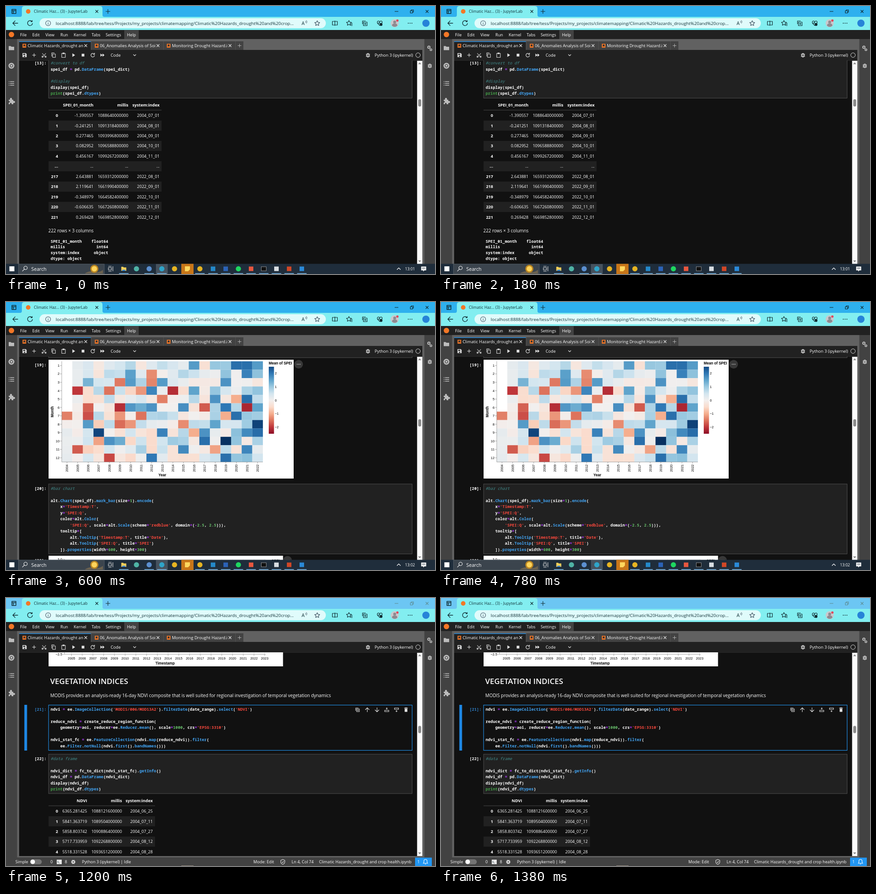
These frames come from a looping animation (947x592 px, 1500 ms). An HTML page:

```html
<!DOCTYPE html>
<html lang="en">
<head>
<meta charset="utf-8">
<title>Notebook scroll</title>
<style>
html, body { margin: 0; width: 100%; height: 100%; overflow: hidden; background: #111; }
svg { display: block; width: 947px; height: 592px; }
text { font-family: "Open Sans", "Noto Sans", sans-serif; fill: #fff; white-space: pre; }
.mono { font: 600 8.84px "Noto Sans Mono", "DejaVu Sans Mono", monospace; }
.chart text { font-family: "Liberation Sans", Arial, sans-serif; fill: #000; }
.bold { font-weight: 700; }
.semi { font-weight: 600; }
.end { text-anchor: end; }
.mid { text-anchor: middle; }
.dark { fill: #14343a; }
.comment { fill: #408a8a; font-weight: 400; font-style: italic; }
.string { fill: #f4473c; }
.number { fill: #66bb6a; }
.op { fill: #b13cff; }
.prop { fill: #42a5f5; }
.builtin { fill: #43a047; }
.page, .thumb, .late, .early, .first, .rest { animation: 1.5s step-end infinite; }
.page { animation-name: page; }
.thumb { animation-name: thumb; }
.late { animation-name: late; }
.early { animation-name: early; }
.first { animation-name: first; }
.rest { animation-name: rest; }
@keyframes page {
  0% { transform: translateY(0); }
  20% { transform: translateY(-1000px); }
  40% { transform: translateY(-2000px); }
  60% { transform: translateY(-2296px); }
  80%, 100% { transform: translateY(-2666px); }
}
@keyframes thumb {
  0% { transform: translateY(0); }
  20% { transform: translateY(31.5px); }
  40% { transform: translateY(53px); }
  60% { transform: translateY(63px); }
  80%, 100% { transform: translateY(76.5px); }
}
@keyframes late { 0% { visibility: hidden; } 80%, 100% { visibility: visible; } }
@keyframes early { 0% { visibility: visible; } 80%, 100% { visibility: hidden; } }
@keyframes first { 0% { opacity: 1; } 20%, 100% { opacity: 0; } }
@keyframes rest { 0% { opacity: 0; } 20%, 100% { opacity: 1; } }
</style>
</head>
<body>
<svg id="stage" viewBox="0 0 947 592"></svg>
<script>
const esc = s => String(s).replace(/&/g, '&amp;').replace(/</g, '&lt;');
const range = (n, fn) => Array.from({ length: n }, (_, i) => fn(i)).join('');
const rect = (x, y, w, h, fill, attr = '') =>
  `<rect x="${x}" y="${y}" width="${w}" height="${h}" fill="${fill}" ${attr}/>`;
const dot = (x, y, r, fill, attr = '') => `<circle cx="${x}" cy="${y}" r="${r}" fill="${fill}" ${attr}/>`;
const line = (d, color, w = 0.74) => `<path d="${d}" fill="none" stroke="${color}" stroke-width="${w}"/>`;
const icon = (x, y, d, color = '#e0e0e0', w = 1.1) =>
  `<path transform="translate(${x} ${y})" d="${d}" fill="none" stroke="${color}" stroke-width="${w}" stroke-linejoin="round"/>`;
const solid = (x, y, d, color = '#e0e0e0') =>
  `<path transform="translate(${x} ${y})" d="${d}" fill="${color}" fill-rule="evenodd"/>`;
const group = (cls, body, y = 0) => `<g class="${cls}"${y ? ` transform="translate(0 ${y})"` : ''}>${body}</g>`;

// y is the middle of the capitals
const text = (x, y, s, cls = '', size = 9.2, attr = '') =>
  `<text x="${x}" y="${(y + size * 0.36).toFixed(2)}" font-size="${size}" class="${cls}" ${attr}>${esc(s)}</text>`;
const mono = (x, y, s, attr = '') => text(x, y, s, 'mono', 8.84, attr);
const prompt = (y, n, attr = '') => mono(62.8, y, `[${n}]:`, attr);

const token = /(#.*)|('[^']*')|(\b\d+(?:\.\d+)?\b)|([=*-])|((?<=\.)[a-z_]\w*)|(\bprint\b)/gi;
const kinds = ['comment', 'string', 'number', 'op', 'prop', 'builtin'];
const paint = s => esc(s).replace(token, (m, ...g) =>
  `<tspan class="${kinds[g.findIndex(v => v !== undefined)]}">${m}</tspan>`);

function cell(y, h, n, src, active) {
  const frame = active
    ? rect(40.5, y, 6, h, '#1e88e5') + rect(94, y + .5, 802.5, h - 1, '#111', 'stroke="#2196f3" stroke-width="1.1"')
    : rect(94, y, 802.5, h, '#212121', 'stroke="#5c5c5c" stroke-width=".8"');
  const rows = src.split('\n').map((s, i) =>
    `<text class="mono" x="98.5" y="${y + 13.1 + i * 13.45}">${paint(s)}</text>`).join('');
  return frame + prompt(y + 10, n, active ? 'style="fill:#2f7fc6"' : '') + rows;
}

const output = (y, rows) => rows.map((s, i) => mono(98.5, y + i * 12.6, s)).join('');

function table(y, width, edges, head, rows) {
  const put = (v, i, yy, bold) => text(edges[i], yy, v, bold ? 'end bold' : 'end', 9.1);
  return head.map((h, i) => put(h, i + 1, y, true)).join('') +
    line(`M94 ${y + 11}h${width}`, '#606060') +
    rows.map((r, k) => {
      const yy = y + 22.8 + k * 22.45;
      return (k % 2 ? rect(94, yy - 11.2, width, 22.4, '#212121') : '') +
        r.split(' ').map((v, i) => put(v, i, yy, i === 0)).join('');
    }).join('');
}

// Monthly index: notable months, mild noise elsewhere
const peaks = {
  2004: { 7: -1.39 }, 2005: { 4: -2, 11: -1.7 },
  2006: { 3: 1.3, 6: -1.65, 7: -1.8, 8: 1.6 }, 2007: { 9: 2.6, 10: -1.1 },
  2008: { 4: -1.5, 10: 1.7, 12: -1.85 }, 2009: { 3: -1.45, 6: -2.1, 7: -1.2, 8: -1.55, 10: 1.4 },
  2010: { 2: 1.55, 3: 1.6, 6: 1.65, 8: -1.2 }, 2011: { 4: -1.2, 6: 1.4, 7: -1.5 },
  2012: { 2: -1.3, 3: -1.35, 4: 1.85, 6: 1.7, 12: 2 }, 2013: { 3: 1.6, 5: -1.4, 9: 1.9 },
  2014: { 4: -2.1 }, 2015: { 6: 1.75, 8: -1.3, 11: 1.8 }, 2016: { 1: 1.6, 4: 1.5, 9: -1 },
  2017: { 6: -1.7, 9: 1.7, 10: 2.1 }, 2018: { 5: 1.7, 8: 1.5, 11: -1.1 },
  2019: { 3: 1.7, 6: 2, 7: -1, 10: 2.9, 12: 2.1 }, 2020: { 1: 2.1, 5: -1, 7: 2.1 },
  2021: { 1: 2.1, 2: 1.9, 5: 2.1, 6: -2.2, 9: 1.8, 11: 1.85 }, 2022: { 1: 1.6, 6: 1.5, 8: 2.64, 9: 2.12 }
};
let seed = 41;
const random = () => (seed = (seed * 16807) % 2147483647) / 2147483647;
const months = [];
for (let n = 6; n < 228; n++) {
  const col = Math.floor(n / 12), row = n % 12;
  // calm at first, wetter later
  const noise = (random() - 0.5) * (col < 2 ? 0.4 : 1.5) + col * 0.025;
  months.push({ n, col, row, v: peaks[2004 + col][row + 1] ?? noise });
}

const ramp = ['8c0d26', 'bf363a', 'dd735c', 'f5ae8e', 'fadccd', 'f2efee',
  'd2e5ef', '9ccae1', '5fa4cc', '2f78b5', '134b85', '052a58'];
function color(v) {
  const p = Math.max(0, Math.min(10.99, (v + 2.5) * 2)), i = Math.floor(p), f = p - i;
  const part = (s, k) => parseInt(s.slice(k, k + 2), 16);
  const mix = k => Math.round(part(ramp[i], k) * (1 - f) + part(ramp[i + 1], k) * f);
  return `rgb(${mix(0)},${mix(2)},${mix(4)})`;
}
const minus = s => String(s).replace('-', '−');
const legend = (x, y, title) => text(x, y - 8.3, title, 'bold', 8.14) +
  rect(x, y, 11.6, 148, 'url(#ramp)') +
  [2, 1, 0, -1, -2].map(v => text(x + 13.4, y + 74 - v * 29.6, minus(v), '', 7.4)).join('');
const menuDot = (x, y) => dot(x, y, 9.5, '#383838') + [-3.2, 0, 3.2].map(d => dot(x + d, y, 1.1, '#aaa')).join('');

function heatMap() {
  const x0 = 123, y0 = 131, w = 444 / 19, h = 222.4 / 12;
  return rect(94, 127.5, 541, 262.5, '#fff') +
    months.map(m => rect((x0 + m.col * w).toFixed(2), (y0 + m.row * h).toFixed(2), w + .1, h + .1, color(m.v))).join('') +
    line(`M${x0} ${y0}v222.4h444`, '#888') +
    range(12, i => line(`M119.3 ${y0 + (i + .5) * h}h3.7`, '#888') +
      text(118, y0 + (i + .5) * h, i + 1, 'end', 7.4)) +
    range(19, i => {
      const x = x0 + (i + .5) * w;
      return line(`M${x} 353.4v3.7`, '#888') +
        text(0, 0, 2004 + i, 'end', 7.4, `transform="translate(${x} 358.8) rotate(-90)"`);
    }) +
    text(345, 382, 'Year', 'bold mid', 8.14) +
    text(0, 0, 'Month', 'bold mid', 8.14, 'transform="translate(102 242.5) rotate(-90)"') +
    legend(580, 143, 'Mean of SPEI');
}

function barChart() {
  const zero = 393.3, unit = 40.4, year = 23.7, yearX = i => 144.5 + i * year;
  return rect(94, 264.5, 517.5, 256.5, '#fff') +
    range(12, i => {
      const y = 272 + i * 20.2;
      return line(`M129 ${y}h444`, '#ddd') + line(`M125.3 ${y}h3.7`, '#888') +
        text(124, y, minus((3 - i / 2).toFixed(1)), 'end', 7.4);
    }) +
    range(19, i => line(`M${yearX(i)} 272v222`, '#ddd') + line(`M${yearX(i)} 494v3.7`, '#888') +
      text(yearX(i), 503, 2005 + i, 'mid', 7.4)) +
    months.map(m => line(`M${(yearX(-1) + m.n * year / 12).toFixed(2)} ${zero}v${(-m.v * unit).toFixed(2)}`, color(m.v), .8)).join('') +
    line('M129 272v222h444', '#888') +
    text(351, 514, 'Timestamp', 'bold mid', 8.14) +
    text(0, 0, 'SPEI', 'bold mid', 8.14, 'transform="translate(101.5 383) rotate(-90)"') +
    legend(586, 284, 'SPEI');
}

const frameTop = cell(116, 87.5, 13, `#convert to df
spei_df = pd.DataFrame(spei_dict)

#display
display(spei_df)
print(spei_df.dtypes)`) +
  table(219, 249.5, [115, 193, 270, 339], ['SPEI_01_month', 'millis', 'system:index'], [
    '0 -1.390557 1088640000000 2004_07_01', '1 -0.241251 1091318400000 2004_08_01',
    '2 0.277465 1093996800000 2004_09_01', '3 0.082952 1096588800000 2004_10_01',
    '4 0.456167 1099267200000 2004_11_01', '... ... ... ...',
    '217 2.643881 1659312000000 2022_08_01', '218 2.119641 1661990400000 2022_09_01',
    '219 -0.348979 1664582400000 2022_10_01', '220 -0.606635 1667260800000 2022_11_01',
    '221 0.269428 1669852800000 2022_12_01']) +
  text(93.5, 496, '222 rows × 3 columns', '', 9.9) +
  output(519.7, ['SPEI_01_month    float64', 'millis             int64', 'system:index      object', 'dtype: object']);

const cleaning = cell(134.7, 73.5, 16, `#some house cleaning
spei_df = spei_df.rename(columns={
    'SPEI_01_month': 'SPEI'
}).drop(columns=['millis', 'system:index'])
spei_df.head(5)`) + prompt(223, 16) +
  table(224, 254, [104, 156, 216, 246, 286, 313, 343], ['SPEI', 'Timestamp', 'Year', 'Month', 'Day', 'DOY'], [
    '0 -1.390557 2004-07-01 2004 7 1 183', '1 -0.241251 2004-08-01 2004 8 1 214',
    '2 0.277465 2004-09-01 2004 9 1 245', '3 0.082952 2004-10-01 2004 10 1 275',
    '4 0.456167 2004-11-01 2004 11 1 306']) +
  cell(365, 33, 17, '#check data type\nspei_df.dtypes') + prompt(412, 17) +
  output(412, [['SPEI', 'float64'], ['Timestamp', 'datetime64[ns]'], ['Year', 'int32'], ['Month', 'int32'],
    ['Day', 'int32'], ['DOY', 'int32']].map(([a, b]) => a + b.padStart(27 - a.length)).concat('dtype: object')) +
  text(97.5, 522.7, 'visualisation', 'semi', 16.3) +
  cell(546, 20.5, 18, '#+VE = wet conditions -Ve= dry conditions');

const vegetation = text(97.5, 183.6, 'VEGETATION INDICES', 'semi', 17) +
  text(97.8, 215, 'MODIS provides an analysis-ready 16-day NDVI composite that is well suited for regional investigation of temporal vegetation dynamics', '', 9.89) +
  cell(236, 101, 21, `ndvi = ee.ImageCollection('MODIS/006/MOD13A2').filterDate(date_range).select('NDVI')

reduce_ndvi = create_reduce_region_function(
    geometry=aoi, reducer=ee.Reducer.mean(), scale=1000, crs='EPSG:3310')

ndvi_stat_fc = ee.FeatureCollection(ndvi.map(reduce_ndvi)).filter(
    ee.Filter.notNull(ndvi.first().bandNames()))`, true) +
  icon(776, 247, 'M-2-2h6v6h-6zM-4 2v-6h6M1-.5v3M-.5 1h3') +
  icon(797.5, 247, 'M0 5v-9M-4.5 0l4.5-4.5L4.5 0') +
  icon(819, 247, 'M0-5v9M-4.5 0l4.5 4.5L4.5 0') +
  icon(840.5, 247, 'M-4.5 1h9v3h-9zM0-5v4.5M-2-3h4') +
  icon(862, 247, 'M-4.5-4h9v3h-9zM0 1v4M-2 3h4') +
  solid(883, 247, 'M-3-2.5h6v7h-6zM-4-4.5h2.5v-.8h3v.8H4v1.2h-8z') +
  cell(345, 87, 22, `#data frame

ndvi_dict = fc_to_dict(ndvi_stat_fc).getInfo()
ndvi_df = pd.DataFrame(ndvi_dict)
display(ndvi_df)
print(ndvi_df.dtypes)`) +
  table(448, 235, [115, 179, 256, 324], ['NDVI', 'millis', 'system:index'], [
    '0 6365.281425 1088121600000 2004_06_25', '1 5841.363719 1089504000000 2004_07_11',
    '2 5858.803742 1090886400000 2004_07_27', '3 5717.733959 1092268800000 2004_08_12',
    '4 5518.331528 1093651200000 2004_08_28']);

const charts = rect(94, 90, 802.5, 33, '#212121', 'stroke="#5c5c5c" stroke-width=".8"') +
  prompt(138.5, 19) + group('chart', heatMap()) + menuDot(646, 137.5) +
  cell(402, 154.5, 20, `#bar chart

alt.Chart(spei_df).mark_bar(size=1).encode(
    x='Timestamp:T',
    y='SPEI:Q',
    color=alt.Color(
        'SPEI:Q', scale=alt.Scale(scheme='redblue', domain=(-2.5, 2.5))),
    tooltip=[
        alt.Tooltip('Timestamp:T', title='Date'),
        alt.Tooltip('SPEI:Q', title='SPEI')
    ]).properties(width=600, height=300)`) +
  prompt(571, 20) + group('chart', barChart(), 296) + menuDot(621.5, 570.5) +
  group('', vegetation, 666);

// Browser window
const cross = 'M-3-3l6 6M3-3l-6 6', plus = 'M-4 0h8M0-4v8';
const star = 'M0-5.5l1.7 3.5 3.9.5-2.9 2.7.8 3.8L0 3.2-3.5 5l.8-3.8-2.9-2.7 3.9-.5z';
const windowButtons = c => icon(862, 12, 'M-4 0h8', c) +
  icon(896, 12, 'M-3.5-1.5h5v5h-5zM-1.5-1.5v-2h5v5h-2', c) + icon(929.5, 12, cross, c);
const browser = rect(0, 0, 947, 53, '#82eef0') +
  rect(0, 0, 947, 24, '#2eb0ee', 'class="early"') + rect(0, 0, 947, 24, '#6cc6f3', 'class="late"') +
  solid(0, 0, 'M31 24q4 0 4-4V6q0-6 6-6h166q6 0 6 6v14q0 4 4 4z', '#82eef0') +
  icon(17.5, 12, 'M-4.5-4.5h9v9h-9zM-4.5-1.5h9M-1.5-1.5v6', '#102a30', 1.4) +
  dot(49, 12, 5, '#f37726') + text(61.5, 12, 'Climatic Haz... (3) - JupyterLab', 'dark', 8.62) +
  icon(200.5, 12, cross, '#102a30') + icon(225, 12, 'M-5 0h10M0-5v10', '#102a30') +
  group('early', windowButtons('#102a30')) + group('late', windowButtons('#5e8f96')) +
  icon(20.5, 38, 'M6 0h-11.5M0-5.5l-5.5 5.5 5.5 5.5', '#102a30', 1.3) +
  icon(53, 38, 'M4-4a5.5 5.5 0 1 0 1.5 4M4.8-6.5v3h-3', '#102a30', 1.3) +
  rect(74, 27, 632, 22, '#e0fbfb', 'rx="11"') +
  icon(93, 38, 'M5.5 0a5.5 5.5 0 1 1-11 0a5.5 5.5 0 1 1 11 0M0-.8v4M0-3.2v1.2', '#456') +
  text(109.8, 38, 'localhost:8888/lab/tree/tess/Projects/my_projects/climatemapping/Climatic%20Hazards_drought%20and%20crop...', 'dark', 9.82) +
  text(652.5, 38.5, 'A', 'dark', 10.5) + icon(661, 35, 'M0-2q2 2 0 4M2-3.5q3 3.5 0 7', '#345', .8) +
  icon(687, 38, star, '#345') +
  icon(726, 38, 'M-5.5-4h11v8h-11zM0-5.5v11', '#102a30', 1.2) +
  icon(757, 37.5, star, '#102a30') + icon(762, 39, 'M-1-1h4M-1 1.5h4M-1 4h4', '#102a30') +
  icon(792, 38, 'M-3-2.5h8v8h-8zM-5 2v-7h7M1-1v5M-1.5 1.5h5', '#102a30', 1.2) +
  icon(825, 38, 'M0 5L-5 0q-1.5-4 2-5 2 0 3 2 1-2 3-2 3.5 1 2 5zM-4 0h2l1-2 2 4 1-2h2', '#102a30', 1.2) +
  dot(828, 41, 3, '#102a30') +
  dot(858, 38, 9, '#c9c9cd') + dot(858, 35.5, 3.2, '#8d8a90') + solid(858, 38, 'M-6 5.5q0-5 6-5t6 5q-6 5-12 0', '#8d8a90') +
  dot(864, 32, 2.6, '#e0475b') +
  [888, 892, 896].map(x => dot(x, 38, 1, '#102a30')).join('') + dot(927, 38, 8, '#2683d8');

// Notebook shell
const menus = [[31, 'File'], [58, 'Edit'], [87, 'View'], [120, 'Run'], [149.5, 'Kernel'], [189, 'Tabs'], [220, 'Settings'], [267, 'Help']];
const tabs = [[29, 'Climatic Hazards_drought an'], [188.5, '06_Anomalies Analysis of Soi'], [347.5, 'Monitoring Drought Hazard.i']];
const bug = 'M-2.5-2.5h5v5.5q-2.5 2.5-5 0zM-4.5-2h9M-4.5.5h9M-4.5 3h9M-1.5-4.5l1 1.5M1.5-4.5l-1 1.5';
const gear = r => `M${r} 0a${r} ${r} 0 1 1 ${-2 * r} 0a${r} ${r} 0 1 1 ${2 * r} 0`;
const shell = rect(0, 53, 947, 20, '#212121') + dot(12, 63, 6, '#f37726') +
  rect(261, 53.5, 32, 19.5, '#424242') + menus.map(([x, s]) => text(x, 63.5, s)).join('') +
  rect(0, 73, 947, 500, '#424242') + rect(24.5, 73, 899, 500, '#616161') +
  solid(12, 93, 'M-6-4.5h4.5l1.5 1.5h6v7.5h-12z', '#bdbdbd') +
  dot(12, 132, 5, 'none', 'stroke="#bdbdbd" stroke-width="3"') + rect(10, 130, 4, 4, '#bdbdbd') +
  icon(12, 171, 'M-6-4h1.5M-6 0h1.5M-6 4h1.5M-3-4h9M-3 0h9M-3 4h9', '#bdbdbd', 1.5) +
  solid(12, 210, 'M-6-3h3q-1-4 2-4t2 4h3v3q4-1 4 2t-4 2v3h-3.5q0-3-2-3t-2 3h-2.5v-3.5q2.5 0 2.5-2t-2.5-2z', '#bdbdbd') +
  icon(933.5, 91, gear(2.5), '#bdbdbd', 2) + icon(938, 96.5, gear(2), '#bdbdbd', 1.7) + icon(935.5, 132, bug, '#bdbdbd', 1.6) +
  tabs.map(([x, s], i) => rect(x, 78, 158.5, 19, i ? '#424242' : '#212121') +
    rect(x + 7.5, 83.5, 8, 8.5, '#f37726') + solid(x + 11.5, 87.7, 'M-2-2.5h4v5l-2-2-2 2z', '#303030') +
    text(x + 18.7, 87.7, s) + icon(x + 147, 87.5, cross)).join('') +
  rect(29, 78, 158.5, 1.3, '#2196f3') + rect(506.5, 78, 17.5, 19, '#424242') + icon(515.5, 87.5, plus, '#bdbdbd', .9) +
  rect(29, 97, 890, 23.5, '#212121') + rect(29, 120.5, 890, 449.5, '#111') +
  solid(41, 108.5, 'M-4.5-4.5h7l2 2v7h-9zM-3-3v2.5h4.5v-2.5zM-1.5 1.2h3v2.5h-3z') +
  icon(62, 108.5, plus) + icon(84, 108.5, 'M-4-4L3 4M4-4L-3 4M-4.8 3.5a1.4 1.4 0 1 0 2.8 0a1.4 1.4 0 1 0-2.8 0M2 3.5a1.4 1.4 0 1 0 2.8 0a1.4 1.4 0 1 0-2.8 0') +
  icon(105, 108.5, 'M-2-2.5h6v7.5h-6zM-4 3v-8h6') + icon(127, 108.5, 'M-4-4h8v9h-8zM-1.5-5h3v2.2h-3z') +
  solid(149, 108.5, 'M-2.5-4l6 4-6 4z') + rect(167, 105.5, 6, 6, '#e0e0e0') +
  icon(191.5, 108.5, 'M3-2.5a4 4 0 1 0 1 3M4-5v3.5h-3.5', '#e0e0e0', 1.2) +
  solid(213, 108.5, 'M-4.5-3.5l4.5 3.5-4.5 3.5zM0-3.5l4.5 3.5L0 3.5z') +
  text(231, 108.5, 'Code') + icon(284, 108.5, 'M-3-1.5l3 3 3-3') +
  icon(799, 108.5, bug, '#e0e0e0', 1.2) + text(813.8, 109, 'Python 3 (ipykernel)') +
  dot(909.5, 108.5, 5, 'none', 'stroke="#e0e0e0"');

const scrollbar = rect(907.5, 121, 11.5, 449, '#fcfcfc') +
  solid(913.2, 126.5, 'M-3.5 2L0-2l3.5 4z', '#888') + solid(913.2, 564, 'M-3.5-2L0 2l3.5-4z', '#888') +
  rect(910, 206, 6.5, 16, '#8a8a8a', 'rx="3" class="thumb"');

// Desktop bar
const round = [[288, '#4fb3a5'], [316, '#5b8fd0'], [344, '#2fa4c9'], [372, '#e6b422'], [428, '#e6b422'], [513, '#1ed760']];
const square = [[457, '#2489ca'], [485, '#2b63b8'], [541, '#e8573f'], [597, '#d8dde2'], [625, '#d04727'], [653, '#2a8ad8']];
const open = [260, 316, 344, 428, 457, 485, 513, 541, 569, 597, 625, 653];
const taskbar = rect(0, 569.5, 947, 22.5, '#1f2d3b') + rect(7.5, 575, 11, 11, '#fff') +
  rect(27.5, 570, 189.5, 22, '#3b444d', 'stroke="#69727a" stroke-width=".6"') +
  icon(42, 580.5, 'M5-2a3.8 3.8 0 1 1-7.6 0a3.8 3.8 0 1 1 7.6 0M-1.5.8l-4.5 4.5', '#fff') +
  text(55.8, 581, 'Search', '', 10.7) +
  solid(0, 0, 'M174 591q10-7 20-4t20-4v8z', '#6c6250') + dot(195, 580.5, 9, '#b98522') + dot(195, 580.5, 6, '#ffd45a') +
  icon(231, 580.5, 'M-5-2.5h7v5h-7zM-5-5.5h7M-5 5.5h7M5-5.5v11', '#ddd') +
  rect(331, 570, 26, 22, '#46525e') + rect(387, 569.5, 27, 22.5, '#c87619') + solid(400.5, 580.5, 'M-5.5-5.5h11v7l-4 4h-7z', '#ffd75e') +
  solid(260, 580.5, 'M-5.5-4.5h4l1.5 1.5h5.5v7.5h-11z', '#f7cf58') + rect(256.5, 582.5, 7, 2.5, '#3d8fd8') +
  round.map(([x, c]) => dot(x, 580.5, 5.7, c)).join('') +
  square.map(([x, c]) => rect(x - 5, 575.5, 10, 10, c)).join('') +
  rect(563.5, 576, 11, 9, '#101010', 'stroke="#aaa" stroke-width=".8"') +
  open.map(x => rect(x - 10.5, 590.2, 21, 1.6, '#7ab8e8')).join('') +
  icon(867, 580.5, 'M-4 2l4-4 4 4', '#fff') +
  text(880.8, 581, '13:01', 'first', 8.6) + text(880.8, 581, '13:02', 'rest', 8.6) +
  solid(922, 580.5, 'M-5.5-5h11v8.5h-4l-2.5 2.5v-2.5h-4.5zM-3.5-2.8v.9h7v-.9zM-3.5-.3v.9h7v-.9z', '#fff');

const status = rect(0, 573, 947, 19, '#424242') +
  text(20.8, 583, 'Simple', '', 8.9) + rect(53, 577.3, 26, 11, '#757575', 'rx="5.5"') + dot(59, 582.8, 5, '#fff') +
  text(98, 583, '0', '', 9.1) + rect(112, 578, 11, 10, '#e8e8e8') + text(113.2, 583, 's_', 'dark', 6.5) +
  text(129.8, 583, '8', '', 9.1) + icon(148.5, 583, gear(3), '#e0e0e0', 2) +
  icon(148.5, 583, 'M-5-1.7h10M-5 1.7h10M-1.7-5v10M1.7-5v10', '#e0e0e0', .8) +
  text(167.8, 583, 'Python 3 (ipykernel) | Idle', '', 9) + text(546, 583, 'Mode: Edit', '', 9.2) +
  icon(611, 583, 'M0-5.5l4.5 2v3.5q0 3.5-4.5 5.5-4.5-2-4.5-5.5v-3.5zM-2 0l1.5 1.7 3-3.2') +
  text(630.5, 583, 'Ln 4, Col 74', '', 9.1) +
  text(691, 583, 'Climatic Hazards_drought and crop health.ipynb', '', 9.13) +
  rect(903, 573.5, 37, 18.5, '#2196f3') + text(908, 583, '1', '', 9.1) +
  icon(926, 582.5, 'M-5 3.5h10l-1.5-2v-3q0-3.5-3.5-3.5t-3.5 3.5v3zM-1.2 5.3h2.4', '#fff') +
  rect(387, 591, 27, 1, '#a0958a');

document.getElementById('stage').innerHTML =
  `<defs><clipPath id="view"><rect x="29" y="120.5" width="879" height="449.5"/></clipPath>
  <linearGradient id="ramp" x1="0" y1="1" x2="0" y2="0">${range(11, i => `<stop offset="${i / 10}" stop-color="#${ramp[i]}"/>`)}</linearGradient></defs>` +
  browser + shell +
  `<g clip-path="url(#view)">${group('page', frameTop + group('', cleaning, 1000) + group('', charts, 2000))}</g>` +
  scrollbar + group('early', taskbar) + group('late', status);
</script>
</body>
</html>
```
